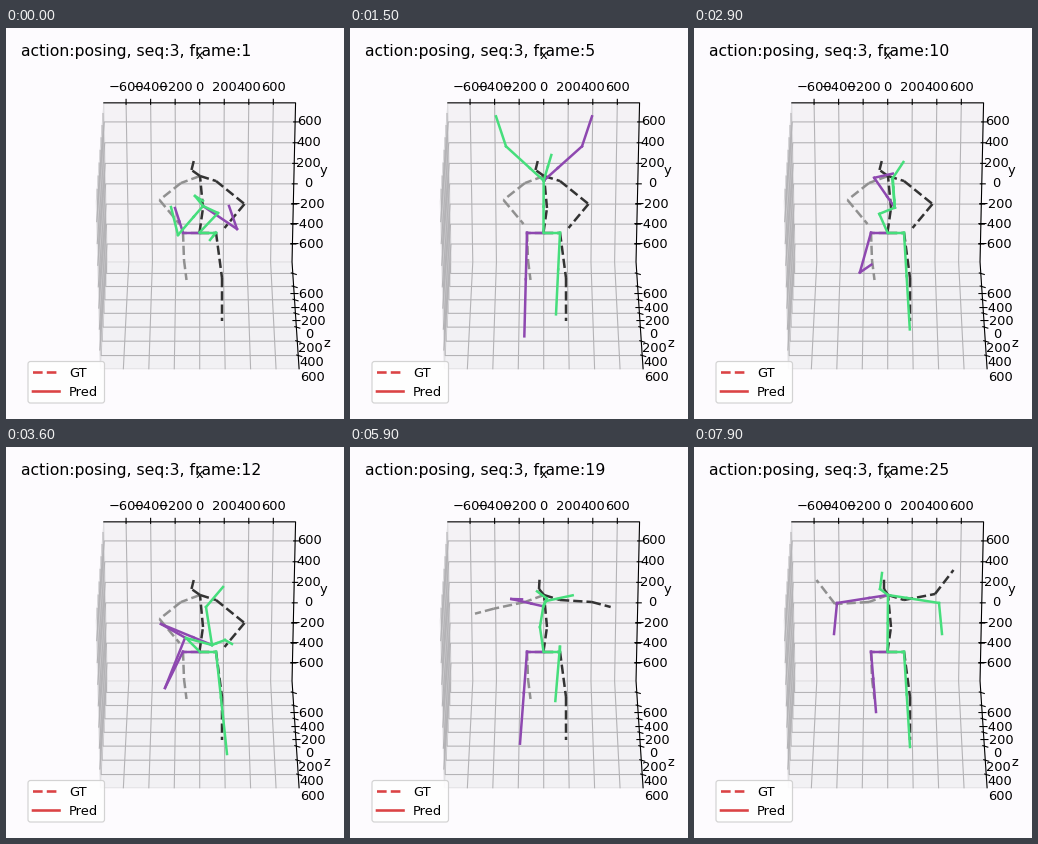
A matplotlib script for the animation above (8000 ms loop, 338x391 px).

```python
import numpy as np
import matplotlib.pyplot as plt
from matplotlib.animation import FuncAnimation
from matplotlib.collections import LineCollection
from matplotlib.patches import FancyBboxPatch

W, H = 338, 391
PX = 0.72  # points per pixel at 100 dpi
TICKS = range(-600, 601, 200)
LIMIT = 781.25
RED = "#db4345"

plt.rcParams["font.family"] = "DejaVu Sans"
fig = plt.figure(figsize=(W / 100, H / 100), dpi=100, facecolor="#fdfbfe")
ax = fig.add_axes([0, 0, 1, 1])
ax.set_xlim(0, W)
ax.set_ylim(H, 0)
ax.axis("off")


def project(x, y, z):
    """Perspective view of the unit cube, in stage pixels."""
    w = 1 - 0.0195 * y - 0.0376 * z
    return 193.7 + 97.6 * x / w, (205.4 - 85.5 * y + 43.7 * z) / w


def path(points, color, width, **kw):
    xs, ys = zip(*points)
    ax.plot(xs, ys, color=color, lw=width * PX, snap=False, **kw)


def label(x, y, text, size=13.05, ha="center"):
    return ax.text(x, y, text, fontsize=size * PX, ha=ha, va="baseline",
                   color="black", zorder=6)


def pane(corners, shade):
    pts = [project(*c) for c in corners]
    ax.fill(*zip(*pts), facecolor=shade, edgecolor="#e0dfe2",
            lw=0.9 * PX, zorder=0)


def draw_box():
    pane([(-1, 1, -1), (-1, -1, -1), (-1, -1, 1), (-1, 1, 1)], "#f7f5f8")
    pane([(-1, -1, -1), (1, -1, -1), (1, -1, 1), (-1, -1, 1)], "#f2f1f4")
    pane([(-1, 1, -1), (1, 1, -1), (1, -1, -1), (-1, -1, -1)], "#f4f2f5")

    for tick in TICKS:
        t = tick / LIMIT
        for line in ([(t, 1, -1), (t, -1, -1), (t, -1, 1)],
                     [(-1, t, 1), (-1, t, -1), (1, t, -1)],
                     [(-1, 1, t), (-1, -1, t), (1, -1, t)]):
            path([project(*p) for p in line], "#b4b3b6", 1.1, zorder=1)

        text = str(tick).replace("-", "\u2212")
        x, y = project(t, 1, -1)
        path([(x, y - 3.5), (x, y + 1.5)], "black", 1.1, zorder=2)
        label(x, 63, text)
        x, y = project(1, t, -1)
        path([(x - 1.5, y), (x + 3.5, y)], "black", 1.1, zorder=2)
        label(x + 14, y + 3.5, text)
        x, y = project(1, -1, t)
        path([(x - 1.5, y - 0.5), (x + 3.5, y + 1)], "black", 1.1, zorder=2)
        label(x + 14, y + 25, text)

    spine = [(-1, 1, -1), (1, 1, -1), (1, -1, -1), (1, -1, 1)]
    path([project(*p) for p in spine], "black", 1.1, zorder=2)
    label(194, 31, "x")
    label(317, 146, "y")
    label(321, 319, "z")


def draw_legend():
    ax.add_patch(FancyBboxPatch((24.5, 336), 71.5, 36.5,
                                boxstyle="round,pad=2.5,rounding_size=2.5",
                                fc="white", ec="#cccccc", lw=1.2 * PX,
                                alpha=0.85, zorder=5))
    for y, text, style in ((344.5, "GT", "--"), (363.5, "Pred", "-")):
        path([(27, y), (53.5, y)], RED, 2.6, ls=style, zorder=6)
        label(63, y + 4.5, text, ha="left")


PELVIS, HIP_L, HIP_R = np.array([(193.5, 204.5), (177, 204.5), (210, 204.5)])


def mix(a, b, t):
    return np.asarray(a) * (1 - t) + np.asarray(b) * t


def mirror(points, axis=194):
    return [(2 * axis - x, y) for x, y in points]


def pose(feet, arm, head=(188, 126), thorax=(194, 148), neck=None,
         spine=None, arm2=None, knee=None, knee2=None):
    """Joints of one pose; those left out follow from their neighbours."""
    return np.array([
        mix(HIP_L, feet[0], 0.45) if knee is None else knee, feet[0],
        mix(HIP_R, feet[1], 0.45) if knee2 is None else knee2, feet[1],
        mix(PELVIS, thorax, 0.5) if spine is None else spine, thorax,
        mix(thorax, head, 0.55) if neck is None else neck, head,
        *arm, *(arm2 or mirror(arm))])


# each arm is its elbow and wrist
POSES = {
    1: pose([(169, 180), (204, 212)], [(231, 201), (223, 178)], (197, 173),
            (197, 178), neck=(189, 168), spine=(212, 185),
            arm2=[(172, 207), (165, 179)]),
    4: pose([(174, 310), (205, 283)], [(239, 123), (248, 93)],
            (203, 128), (194, 153)),
    7: pose([(175, 305), (208, 293)], [(218, 109), (230, 79)],
            (198, 125), (193, 152)),
    12: pose([(179, 191), (221, 307)], [(155, 177), (178, 190)], (217, 140),
             (206, 198), neck=(200, 160), spine=(180, 191),
             arm2=[(219, 193), (226, 197)], knee=(159, 241)),
    15: pose([(180, 282), (214, 304)], [(148, 120), (118, 125)], (187, 123)),
    21: pose([(165, 304), (201, 229)], [(168, 168), (199, 166)], (187, 155),
             (193, 165), neck=(200, 160), spine=(188, 182),
             arm2=[(174, 171), (199, 160)], knee2=(209, 175)),
    25: pose([(182, 265), (216, 300)], [(143, 156), (140, 187)],
             neck=(186, 142)),
}

# arm spread at elbow and wrist with their heights, then body axis and tilt
REACH = {
    12: (42.5, 174, 22.5, 198, 196, 2),
    15: (45, 167, 42.5, 196, 195.5, 0),
    21: (51, 154, 80.5, 147, 191.5, -5),
    25: (50, 152, 68.5, 128, 191, -5),
}


def blend(n, keyed):
    rows = np.array(list(keyed.values()), float)
    flat = rows.reshape(len(rows), -1).T
    out = [np.interp(n, list(keyed), col) for col in flat]
    return np.reshape(out, rows.shape[1:])


def bones(*chains):
    return [(a, b) for c in chains for a, b in zip(c, c[1:])]


def truth(n):
    ex, ey, wx, wy, axis, tilt = blend(n, REACH)
    thorax = (194, 148)
    neck = (np.interp(n, [12, 21], [185.5, 190]), 142)
    head = (np.interp(n, [12, 21], [188.5, 190]), 130)
    left = bones([PELVIS, HIP_L, (178, 232), (180.5, 252)],
                 [thorax, (175, 155), (axis - ex, ey - tilt),
                  (axis - wx, wy - tilt)])
    right = bones([PELVIS, HIP_R, (216, 250), (216, 293)],
                  [PELVIS, (197, 180), thorax, neck, head],
                  [thorax, (210, 153), (axis + ex, ey + tilt),
                   (axis + wx, wy + tilt)])
    return left, right


def guess(n):
    k1, f1, k2, f2, spine, thorax, neck, head, e1, w1, e2, w2 = blend(n, POSES)
    purple = bones([PELVIS, HIP_L, k1, f1],
                   [thorax, mix(thorax, e1, 0.37), e1, w1])
    green = bones([PELVIS, HIP_R, k2, f2],
                  [PELVIS, spine, thorax, neck, head],
                  [thorax, mix(thorax, e2, 0.37), e2, w2])
    return purple, green


def limbs(color, z, **kw):
    return ax.add_collection(LineCollection(
        [], colors=color, linewidths=2.5 * PX, zorder=z, **kw))


draw_box()
draw_legend()
title = label(15, 28, "", 15.66, ha="left")
groups = [limbs("#909090", 3, linestyles="dashed"),
          limbs("#333333", 3, linestyles="dashed"),
          limbs("#8e48b0", 4, capstyle="projecting"),
          limbs("#46de7c", 4, capstyle="projecting")]


def update(i):
    # the pose holds for three or four steps, then jumps to the next
    n = 1 + (3 * max(i - 1, 0) + 6) // 10
    title.set_text(f"action:posing, seq:3, frame:{n}")
    for group, segments in zip(groups, truth(n) + guess(n)):
        group.set_segments(segments)
    return [title, *groups]


anim = FuncAnimation(fig, update, frames=80, interval=100,
                     init_func=lambda: update(0), repeat=True, repeat_delay=0)
plt.show()
```
